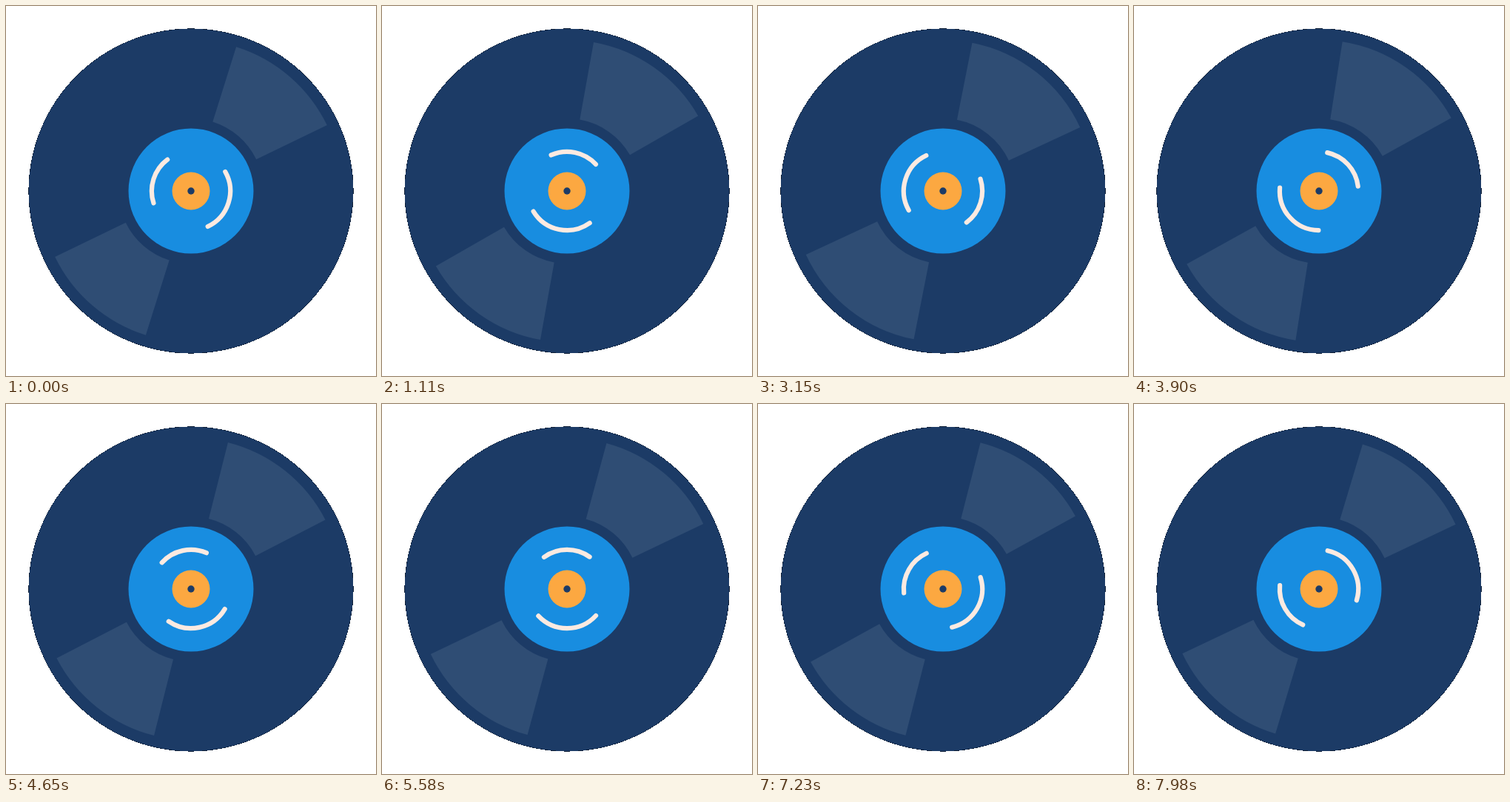
An HTML page without scripts for the animation above (8000 ms loop, 500x500 px).

```html
<!DOCTYPE html>
<html lang="en">
<head>
<meta charset="utf-8">
<title>Spinning record</title>
<style>
  html, body { margin: 0; width: 100%; height: 100%; overflow: hidden; background: #fff; }
  svg { display: block; width: 100%; height: 100%; }
  .rim, .disc { shape-rendering: crispEdges; }
  .rim { fill: #0e1e35; }
  .disc, .hole { fill: #1c3b66; }
  .shine { fill: none; stroke: #2f4d74; stroke-width: 106.2; stroke-dasharray: 46.8 133.2; stroke-dashoffset: 113.4; }
  .label { fill: #188de0; }
  .marks { fill: none; stroke: #fceae1; stroke-width: 6.2; stroke-linecap: round; stroke-dasharray: 94 97.5 71 97.5; stroke-dashoffset: 47; }
  .hub { fill: #fca841; }
</style>
</head>
<body>
<svg viewBox="-250 -250 500 500">
  <circle class="rim" r="219.6"/>
  <circle class="disc" r="219.1"/>

  <!-- Two opposite light wedges: they sway slowly while widening and narrowing -->
  <g transform="rotate(-49.2)">
    <animateTransform id="sway" attributeName="transform" type="rotate"
      begin="0s; sway.end" dur="2.7s" repeatDur="8s"
      calcMode="spline" keyTimes="0; .5; 1" keySplines=".25 .27 .6 1; .25 .27 .6 1"
      values="-49.2; -55.1; -49.2"/>
    <circle class="shine" r="151.1" pathLength="360" transform="rotate(-90)">
      <animate id="widen" attributeName="stroke-dasharray"
        begin="0s; widen.end" dur=".9s" repeatDur="8s"
        calcMode="spline" keyTimes="0; .5; 1" keySplines=".364 0 .636 1; .364 0 .636 1"
        values="46.8 133.2; 54 126; 46.8 133.2"/>
      <!-- Keeps each wedge centred as its dash grows -->
      <animate id="center" attributeName="stroke-dashoffset"
        begin="0s; center.end" dur=".9s" repeatDur="8s"
        calcMode="spline" keyTimes="0; .5; 1" keySplines=".364 0 .636 1; .364 0 .636 1"
        values="113.4; 117; 113.4"/>
    </circle>
  </g>

  <circle class="label" r="84.5"/>
  <g transform="rotate(17.3)">
    <animateTransform attributeName="transform" type="rotate"
      dur="8s" repeatCount="indefinite" from="17.3" to="3217.3"/>
    <circle class="marks" r="53.1" pathLength="360"/>
  </g>
  <circle class="hub" r="25.5"/>
  <circle class="hole" r="4.7"/>
</svg>
</body>
</html>
```
